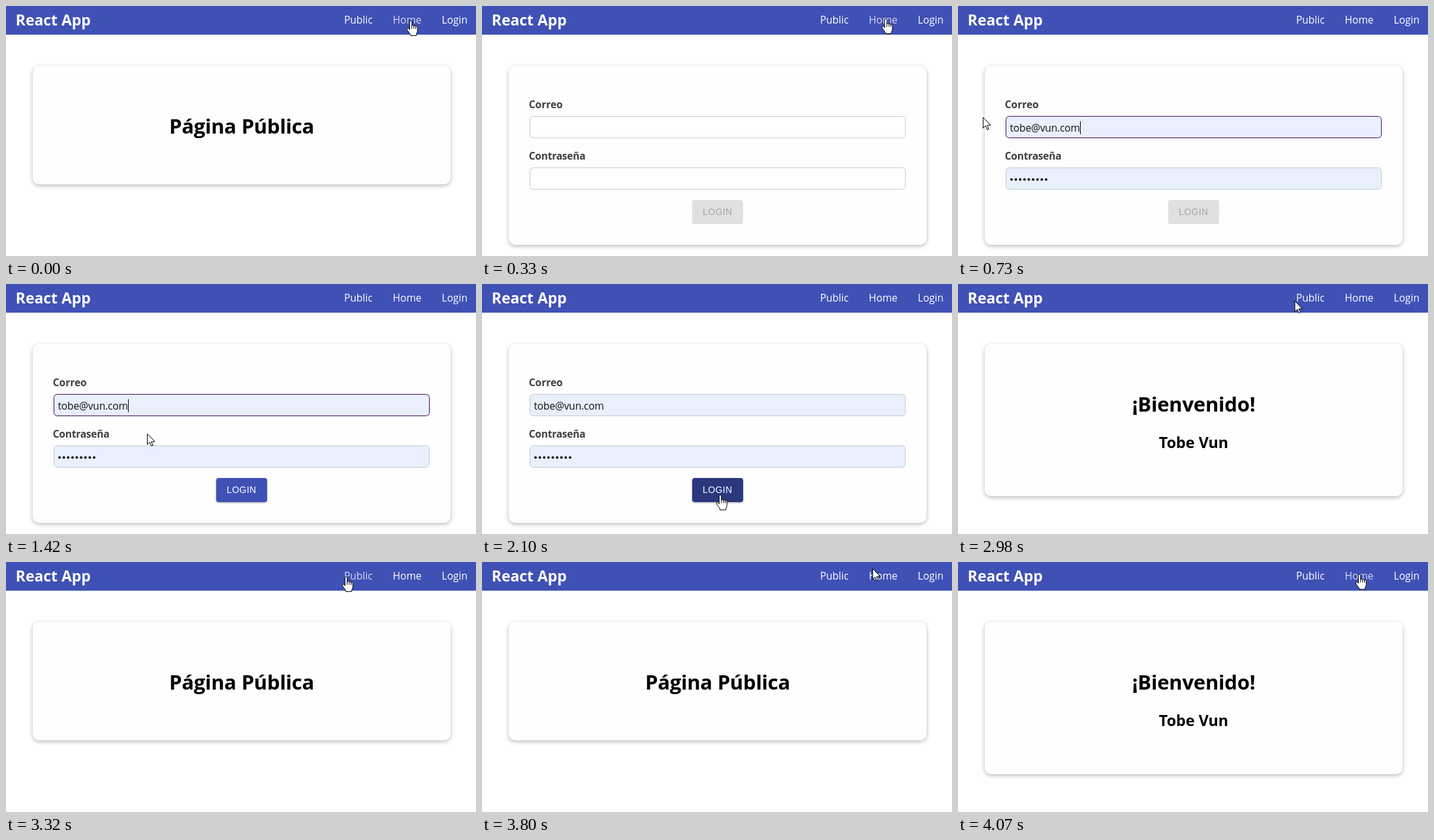
An HTML page for the animation above (4340 ms loop, 720 by 384 pixels).

```html
<!DOCTYPE html>
<html lang="es">
<head>
<meta charset="utf-8">
<title>React App</title>
<style>
html, body { margin: 0; width: 100%; height: 100%; overflow: hidden; background: #fff; }
svg { display: block; width: 720px; height: 384px; font-family: "Open Sans", "Noto Sans", sans-serif; }
.nav { font-size: 15.5px; fill: #fff; }
.brand { font-size: 22.9px; font-weight: 700; fill: #fff; }
.title { font-size: 31px; font-weight: 700; text-anchor: middle; letter-spacing: -.23px; }
.name { font-size: 23.3px; font-weight: 700; text-anchor: middle; }
.label { font-size: 15.5px; font-weight: 700; fill: #3d3f43; }
.value { font-size: 15.5px; letter-spacing: -.15px; fill: #111; }
.button { font: 14px "Liberation Sans", Arial, sans-serif; letter-spacing: .4px; }
.field { stroke: #c6cad0; }
#card { fill: #fefefe; filter: drop-shadow(0 2px 3px rgba(0, 0, 0, .28)); }
.cursor { fill: #fff; stroke: #000; stroke-linejoin: round; stroke-linecap: round; }
</style>
</head>
<body>
<svg viewBox="0 0 720 384">
  <rect width="720" height="384" fill="#fff"/>
  <rect width="720" height="44" fill="#3f51b5"/>
  <text class="brand" x="14.8" y="29.5">React App</text>
  <g class="nav">
    <text id="public" x="518" y="27">Public</text>
    <text id="home" x="592.6" y="27">Home</text>
    <text x="667.6" y="27">Login</text>
  </g>

  <rect id="card" x="41" y="92" width="640" height="182" rx="10"/>

  <g id="publicPage">
    <text class="title" x="361" y="196">Página Pública</text>
  </g>

  <g id="welcomePage">
    <text class="title" x="361" y="196">¡Bienvenido!</text>
    <text class="name" x="361" y="252">Tobe Vun</text>
  </g>

  <g id="formPage">
    <text class="label" x="71.7" y="157">Correo</text>
    <rect id="mail" class="field" x="73.5" y="169.5" width="575" height="33" rx="5"/>
    <text class="label" x="71.7" y="236" letter-spacing="-.22">Contraseña</text>
    <rect id="pass" class="field" x="73.5" y="248.5" width="575" height="33" rx="5"/>
    <g id="values">
      <text class="value" x="79.5" y="193">tobe@vun.com</text>
      <path d="M82 266.5H135.5" stroke="#111" stroke-width="4" stroke-linecap="round" stroke-dasharray="0 6.62"/>
    </g>
    <path id="caret" d="M187.5 177V197" stroke="#000"/>
    <rect id="button" x="322" y="298" width="78" height="37" rx="4"/>
    <text id="buttonText" class="button" x="338" y="321">LOGIN</text>
  </g>

  <path id="arrow" class="cursor" d="M.5 .5V16.6L4.2 13.1 6.8 18.9 9.1 17.9 6.6 12.2H11.6Z"/>
  <g id="hand" class="cursor">
    <path d="M-1.7 14V2.2a1.7 1.7 0 0 1 3.4 0V8.5a1.6 1.6 0 0 1 3.1 .4a1.6 1.6 0 0 1 2.9 .8a1.5 1.5 0 0 1 2.6 1.3V16c0 3-1.9 4-1.9 7.5H-.3c0-3-3-5-5.3-9-1-2.4 1.4-3.6 3.9-.5Z"/>
    <path d="M1.7 8.5V12.5M4.8 8.9V12.5M7.7 9.7V12.8" fill="none"/>
  </g>
</svg>

<script>
const LOOP = 4340, STEP = 68; // ms per loop, ms per pointer step
const el = id => document.getElementById(id);
const paint = (id, attr, value) => el(id).setAttribute(attr, value);
const show = (id, on) => paint(id, "visibility", on ? "visible" : "hidden");
const ramp = (t, from, span) => Math.min(1, Math.max(0, (t - from) / span));
const smooth = k => k * k * (3 - 2 * k);
const mix = (a, b, k) => a.map((v, i) => v + (b[i] - v) * k);
const rgb = c => `rgb(${c.map(Math.round).join()})`;

const cardHeight = { public: 182, form: 275, welcome: 234 };
const visits = [
  { at: 0, page: "public" }, { at: 270, page: "form" }, { at: 2360, page: "welcome" },
  { at: 3190, page: "public" }, { at: 4000, page: "welcome" }
];

const rest = [620, 22];
const moves = [
  { from: 270, to: 330, end: [617, 16] },
  { from: 730, to: 730, end: [38, 171] },
  { from: 930, to: 1420, end: [216, 230] },
  { from: 1470, to: 1970, end: [365, 323.5] },
  { from: 2570, to: 2840, end: [500, 37] },
  { from: 2910, to: 3040, end: [521, 22] },
  { from: 3380, to: 3660, end: [592, 7] },
  { from: 3730, to: 4070, end: [615, 18.5] }
];

// Each move advances in even time steps, the first one at once
function pointer(t) {
  let pos = rest;
  for (const { from, to, end } of moves) {
    if (t < from) break;
    const steps = Math.round((to - from) / STEP) + 1;
    const done = Math.floor((t - from) / STEP) + 1;
    pos = mix(pos, end, smooth(Math.min(1, done / steps)));
  }
  return pos;
}

function drawButton(t) {
  const on = ramp(t, 900, 250);
  let color = mix([224, 224, 224], [63, 81, 181], on);
  color = mix(color, [48, 63, 159], ramp(t, 1750, 250));
  color = mix(color, [44, 56, 126], ramp(t, 2000, 100));
  paint("button", "fill", rgb(color));
  paint("buttonText", "fill", rgb(mix([166, 166, 166], [255, 255, 255], on)));
  el("button").style.filter = `drop-shadow(0 1.5px 1.5px rgba(0,0,0,${0.35 * on}))`;
}

function drawForm(t) {
  const filled = t >= 730, focused = filled && t < 2040;
  for (const id of ["mail", "pass"]) paint(id, "fill", filled ? "#e8f0fe" : "#fff");
  el("mail").style.stroke = focused ? "#430a5c" : "";
  show("values", filled);
  show("caret", focused && (t < 1470 || t >= 1970));
  drawButton(t);
}

function drawPointer(t, page) {
  const [x, y] = pointer(t);
  const over = (left, top, w, h) => x >= left && x <= left + w && y >= top && y <= top + h;
  const overPublic = over(517, 10, 45, 23);
  const overHome = over(592, 10, 45, 23);
  const overButton = page === "form" && over(322, 298, 78, 37);
  const hand = overPublic || overHome || overButton;
  paint("public", "fill", overPublic ? "#d5d9f0" : "#fff");
  paint("home", "fill", overHome ? "#d5d9f0" : "#fff");
  for (const id of ["arrow", "hand"]) {
    paint(id, "transform", `translate(${x} ${y})`);
    show(id, hand === (id === "hand"));
  }
}

function render(t) {
  const { page } = visits.filter(v => v.at <= t).pop();
  for (const name in cardHeight) {
    el(name + "Page").style.display = name === page ? "" : "none";
  }
  paint("card", "height", cardHeight[page]);
  if (page === "form") drawForm(t);
  drawPointer(t, page);
}

const start = performance.now();
function tick() {
  render((performance.now() - start) % LOOP);
  requestAnimationFrame(tick);
}
tick();
</script>
</body>
</html>
```
